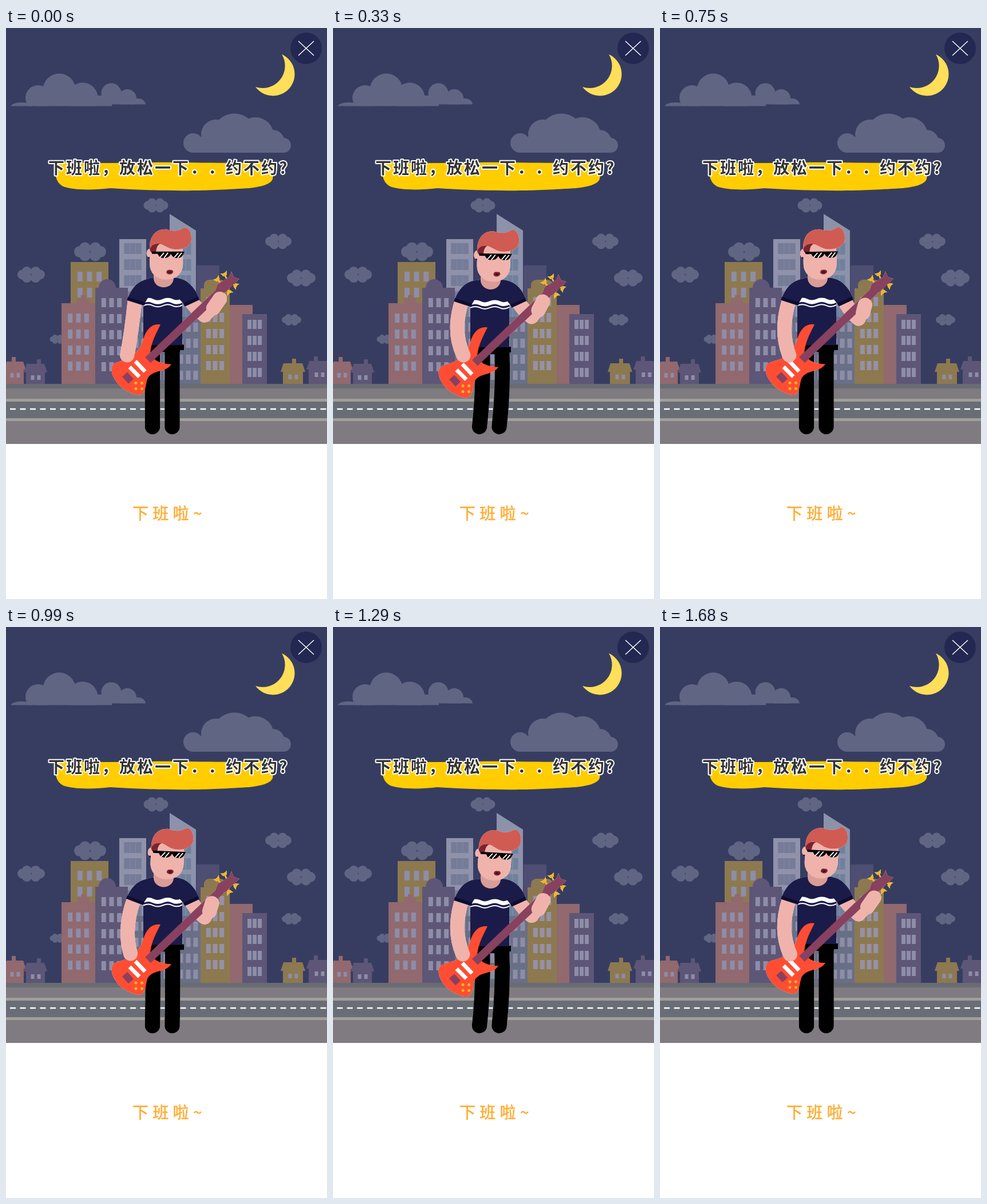
Recreate the animation shown at these times as an HTML page. Size 561 px wide and 998 px high, loop 1.77 s.

```html
<!DOCTYPE html>
<html lang="zh-CN">
<head>
<meta charset="utf-8">
<style>
html, body { margin: 0; width: 100%; height: 100%; overflow: hidden; background: #fff; }
svg { display: block; width: 100%; height: 100%; }
text { font-family: "Noto Sans CJK SC", "Noto Sans CJK", sans-serif; text-spacing-trim: space-all; }
#player { filter: drop-shadow(0 0 .5px rgba(255,255,255,.9)); }
.skin { stroke: #efb3ac; stroke-width: 25; fill: none; stroke-linecap: round; stroke-linejoin: round; }
.leg { stroke: #000; stroke-width: 26.5; fill: none; stroke-linecap: round; }
</style>
</head>
<body>
<svg viewBox="0 0 561 998">
  <rect width="561" height="727" fill="#373d61"/>
  <g id="clouds" fill="#5f6583">
    <clipPath id="cloudBase"><path d="M0 70H260V133.5H185V136.5H0Z M300 140H510V218H300Z"/></clipPath>
    <g clip-path="url(#cloudBase)">
      <ellipse cx="27" cy="138" rx="19" ry="8"/><circle cx="56" cy="122" r="22"/>
      <circle cx="93" cy="108" r="28.5"/><circle cx="134" cy="122" r="26.5"/>
      <circle cx="184" cy="114" r="17.5"/><circle cx="212" cy="123" r="16"/>
      <ellipse cx="230" cy="134" rx="14" ry="11"/><rect x="50" y="118" width="165" height="20"/>
      <circle cx="327" cy="201" r="17"/><circle cx="367" cy="186" r="26"/><circle cx="399" cy="189" r="39.5"/>
      <circle cx="436" cy="188" r="32"/><circle cx="466" cy="199" r="21"/><circle cx="485" cy="205" r="13"/>
      <rect x="327" y="190" width="158" height="28"/>
    </g>
  </g>
  <path d="M482 46A37.9 37.9 0 1 1 436 103A39 39 0 0 0 482 46Z" fill="#ffde59"/>
  <circle cx="524.5" cy="35.5" r="27.5" fill="#222851"/>
  <path d="M511 23L538 48M538 23L511 48" stroke="#fff" stroke-width="1.5"/>
  <path d="M94 234C140 237 190 236 250 235S400 238 440 234C455 233 468 236 469 243L466 264C462 275 440 278 425 280C390 282 350 284 330 284C290 285 230 283 182 280C150 284 115 283 100 277C86 270 84 252 88 240Q90 234 94 234Z" fill="#ffcd00"/>
  <text x="74" y="255" font-size="28" font-weight="700" letter-spacing="3" fill="#333" stroke="#fff" stroke-width="4" stroke-linejoin="round" paint-order="stroke">下班啦，放松一下．．约不约?</text>
  <g id="city"></g>
  <g id="road">
    <rect y="622" width="561" height="105" fill="#7f7b80"/>
    <rect y="622" width="561" height="8" fill="#696c73"/>
    <rect y="648" width="561" height="39" fill="#a29e9a"/>
    <rect y="653" width="561" height="29" fill="#696e76"/>
    <path d="M7 666H561" stroke="#fff" stroke-width="2.5" stroke-dasharray="10 7.5"/>
  </g>
  <g id="player">
    <path id="legL" class="leg"/><path id="legR" class="leg"/>
    <g id="torso">
      <path d="M243 553H311V563H304V566H243Z" fill="#000"/>
      <path d="M258 436Q276 446 294 436Q320 438 327 458L308 480V554H240V480L228 458Q235 438 258 436Z" fill="#1b1b49"/>
      <g fill="none" stroke="#fff">
        <path d="M240 477Q249 473 257 477T274 477T291 477T308 476" stroke-width="7"/>
        <path d="M240 485Q249 481 257 485T274 485T291 485T308 484" stroke-width="2"/>
      </g>
      <path d="M258 425H293V437A17.5 16 0 0 1 258 437Z" fill="#d99c96"/>
    </g>
    <g id="head">
      <ellipse cx="251" cy="394" rx="5.5" ry="8" fill="#efb3ac"/>
      <circle cx="249.5" cy="402" r="2" fill="#1b1b49"/>
      <rect x="251" y="365" width="58" height="75" rx="27" fill="#efb3ac"/>
      <path d="M251 387Q253 376 270 377Q263 379 262 391L253 392Z" fill="#7a2430"/>
      <path d="M251 387C250 364 262 351 280 352C296 357 303 354 311 349C320 348 324 359 324 368C324 381 312 387 298 387C283 388 276 377 265 377Q255 377 251 387Z" fill="#d05b53"/>
      <path d="M254 391H312L309 397Q306 403 299 402Q292 403 288 395Q284 403 276 402Q268 403 265 395H255Z" fill="#000"/>
      <path d="M269 401L276 393M276 402L283 393M294 401L301 393M300 402L307 393" stroke="#fff" stroke-width="1.8"/>
      <path d="M280 427Q281 422 286 423Q292 422 292 427Q290 431 285 431Q280 430 280 427Z" fill="#7a2430"/>
      <ellipse cx="286" cy="427" rx="3" ry="1.5" fill="#3c101c"/>
    </g>
    <path id="armR" class="skin"/>
    <g id="sleeveR">
      <path d="M296 438Q324 439 337 471L312 484L300 470Z" fill="#1b1b49"/>
      <path d="M337 472L311 484" stroke="#0d0d30" stroke-width="6"/>
    </g>
    <g id="guitar">
      <path d="M270 520C254 517 245 530 240 545C236 561 229 568 217 577C207 584 194 583 187 590C180 601 189 618 201 629C213 638 226 643 234 643C246 639 243 624 248 613C258 598 280 604 289 589Q274 589 263 583L252 574C252 557 259 541 270 520Z" fill="#ff4d33"/>
      <path d="M248 582L376 460" stroke="#88415f" stroke-width="14"/>
      <g id="pegs" fill="#f5b61c" stroke="#f5b61c"></g>
      <path d="M366 460L370 449L390 437L394 427L398 437L408 440L398 449L384 463L374 467Z" fill="#88415f"/>
      <path d="M216 594L233 611M226 584L243 602" stroke="#fff" stroke-width="7"/>
      <path d="M203 611L212 603L223 615L214 623Z" fill="#88415f"/>
      <path d="M227 622H238M227 632H238" stroke="#ffb81c" stroke-width="5" stroke-linecap="round" stroke-dasharray="0 10.5"/>
    </g>
    <path id="handR" class="skin"/>
    <path id="armL" class="skin"/>
    <g id="sleeveL">
      <path d="M256 437Q226 438 215 473L245 481L254 462Z" fill="#1b1b49"/>
      <path d="M214 475L245 482" stroke="#0d0d30" stroke-width="6"/>
    </g>
  </g>
  <text x="221" y="859" font-size="28" font-weight="500" letter-spacing="7.3" fill="#ffad33" stroke="#ffad33" stroke-width=".6">下班啦~</text>
</svg>
<script>
const $ = id => document.getElementById(id);
const set = (id, name, value) => $(id).setAttribute(name, value);

// ---- scenery ----
const rect = (x, y, w, h, fill) => `<rect x="${x}" y="${y}" width="${w}" height="${h}" fill="${fill}"/>`;
const poly = (points, fill) => `<polygon points="${points}" fill="${fill}"/>`;
const pink = '#91696f', gold = '#8d7950', plum = '#5d5677', pane = '#8e8da8';

// A block with evenly spread windows, reaching down to the road.
function tower(x, y, w, fill, cols = 0, top = 18, paneW = 8, paneH = 16, glass = pane) {
  let out = rect(x, y, w, 622 - y, fill);
  const pitch = (w - 16) / cols;
  for (let r = y + top; cols && r < 605; r += 28)
    for (let c = 0; c < cols; c++)
      out += rect(x + 8 + pitch * (c + .5) - paneW / 2, r, paneW, paneH, glass);
  return out;
}

function house(x, y, w, fill, chimney) {
  return rect(chimney, y - 8, 7, 14, fill) + rect(x + 4, y + 10, w - 8, 612 - y, fill) +
    poly(`${x + 5},${y} ${x + w - 5},${y} ${x + w},${y + 15} ${x},${y + 15}`, fill) +
    rect(x + w / 2 - 8, y + 20, 6, 8, pane) + rect(x + w / 2 + 3, y + 20, 6, 8, pane);
}

function smallCloud(x, y, w) {
  let out = '';
  for (let i = 0; i < 6; i++) {
    const a = i * Math.PI / 3;
    out += `<ellipse cx="${x + .32 * w * Math.cos(a)}" cy="${y + .13 * w * Math.sin(a)}" rx="${.18 * w}" ry="${.18 * w}"/>`;
  }
  return out;
}

$('city').innerHTML =
  tower(198, 369, 47, '#8f92aa', 3, 7, 10, 19, '#767c98') +
  poly('286,325 332,354 332,380 286,380', '#8d92ab') +
  tower(286, 372, 46, '#8d92ab', 3, 4, 9, 20, '#70819d') +
  tower(333, 415, 40, '#4e4d72') +
  tower(213, 505, 133, '#696f86', 9, 10) +
  tower(113, 409, 66, gold, 3, 17, 9, 17) +
  rect(124, 473, 21, 9, pink) + rect(131, 467, 9, 8, pink) +
  tower(97, 481, 59, pink, 3) +
  `<circle cx="177" cy="454" r="15" fill="${plum}"/>` + tower(156, 454, 57, plum, 3) +
  tower(390, 484, 41, pink) +
  `<rect x="346" y="440" width="38" height="30" rx="9" fill="${gold}"/>` +
  tower(340, 455, 51, gold, 3, 15, 8, 16, '#9592a6') +
  tower(413, 500, 43, plum, 3, 10, 7) +
  house(-4, 583, 39, pink, 10) + house(31, 587, 41, plum, 54) +
  house(480, 586, 43, gold, 500) + house(525, 582, 45, plum, 538) +
  `<g fill="#5f6583">${smallCloud(147, 391, 56)}</g>`;

$('clouds').innerHTML += smallCloud(262, 310, 43) + smallCloud(476, 373, 46) + smallCloud(516, 437, 50) +
  smallCloud(499, 510, 34) + smallCloud(44, 431, 48) + smallCloud(90, 544, 27);

const peg = (x, y, turn) => `<g transform="translate(${x} ${y}) rotate(${turn})">
  <path d="M0 0V10" stroke-width="2.5"/><path d="M-5 -1Q0 2 5 -1L3 4H-3Z"/></g>`;
$('pegs').innerHTML = peg(368, 439, -40) + peg(381, 430, -25) + peg(391, 465, 150) + peg(403, 453, 120);

// ---- motion ----
const STEP = 30, LOOP = 1770, LAST = 56;
const mix = (a, b, k) => a + (b - a) * k;

// Swings 0..1, a whole number of times per loop, highest at the given time.
const wave = (t, times, peak) => (1 + Math.cos(2 * Math.PI * times * (t - peak) / LOOP)) / 2;

// The strumming arm flies out once per strum and then snaps back.
const STRUMS = 13, FLICK_AT = .15, FLICK_HALF = .14;
function flick(t) {
  const gap = Math.abs(t * STRUMS / LOOP % 1 - FLICK_AT) / FLICK_HALF;
  return gap < 1 ? Math.cos(gap * Math.PI / 2) ** 2 : 0;
}

function draw(time) {
  const t = STEP * Math.min(Math.floor(time % LOOP / STEP), LAST);
  const bob = wave(t, 2, 360), nod = wave(t, 5, 230), slide = wave(t, 1, -90);
  const strum = wave(t, STRUMS, 54), out = flick(t);

  const drop = 4 * bob, knee = 5 * bob * bob;
  const leg = x => `M${x + knee} ${562 + drop}Q${x + knee * 1.5} 632 ${x} 697`;
  set('legL', 'd', leg(256));
  set('legR', 'd', leg(290.5));
  set('torso', 'transform', `translate(0 ${drop})`);
  set('head', 'transform', `translate(${nod} ${drop - .5}) rotate(${mix(-1, 3.5, nod)} 284 427)`);
  set('guitar', 'transform', `translate(0 ${mix(-2, 3.5, bob)})`);

  const fretX = mix(358, 374, slide), fretY = mix(484, 473, slide);
  const elbowX = 347, elbowY = mix(508, 502, slide);
  set('armR', 'd', `M322 476Q332 ${elbowY - 12} ${elbowX} ${elbowY}L${fretX} ${fretY}`);
  set('handR', 'd', `M${mix(elbowX, fretX, .5) + 2} ${mix(elbowY, fretY, .5) + 2}L${fretX} ${fretY}`);
  set('sleeveR', 'transform', `translate(0 ${drop * .6})`);

  set('armL', 'd', `M225 478Q${mix(221, 208, strum)} 530 ${mix(210, 228, strum)} 572`);
  set('armL', 'transform', `rotate(${82 * out} 238 450)`);
  set('sleeveL', 'transform', `translate(0 ${drop * .6}) rotate(${5 + 70 * out} 240 450)`);
}

const start = performance.now();
function tick() {
  draw(performance.now() - start);
  requestAnimationFrame(tick);
}
tick();
</script>
</body>
</html>
```
